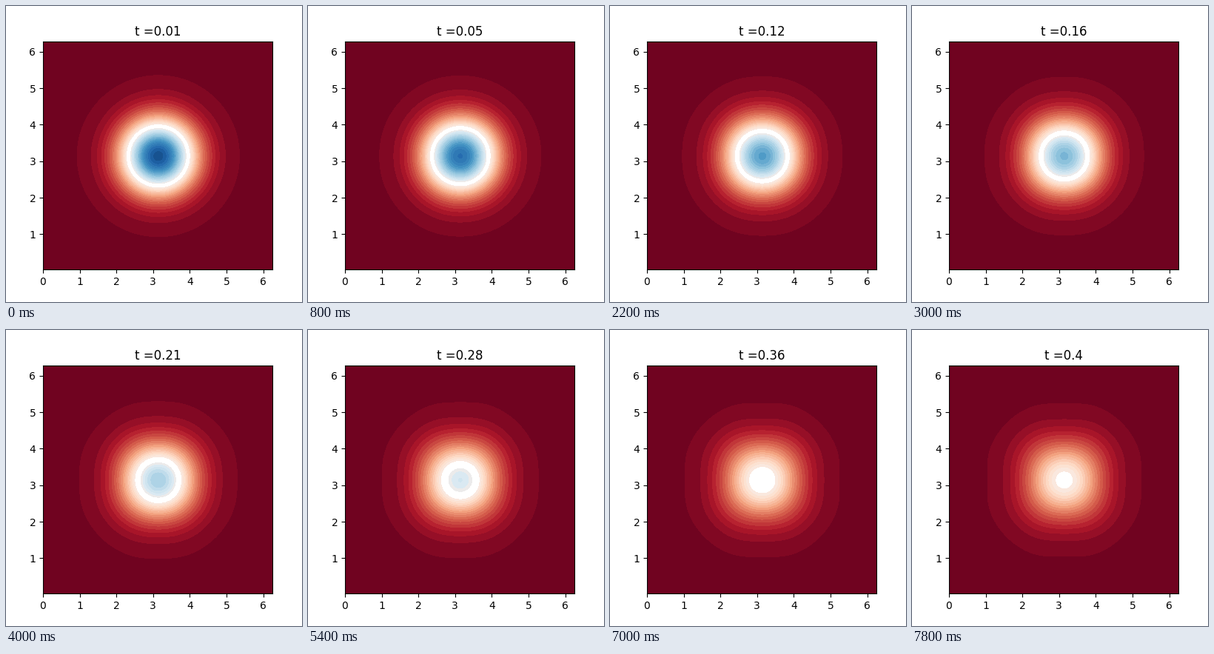
Animation, 400 px wide and 400 px high, one loop 8000 ms. Source, as a matplotlib script:

```python
import numpy as np
import matplotlib.pyplot as plt
from matplotlib.animation import FuncAnimation

FRAMES, STEP_MS = 40, 200
DT = 0.01
N = 200
H = 2 * np.pi / N

x = np.arange(N) * H
X, Y = np.meshgrid(x, x + H)
DX, DY = X - np.pi, Y - np.pi
R2 = DX**2 + DY**2

# The bump sinks fastest in the middle and along both axes, hardly on the diagonals.
RATE = (1.75 - 0.09 * R2) * np.exp(-0.5 * (DX * DY) ** 2)

LEVELS = np.linspace(-0.02, 1.05, 40)
BANDS = len(LEVELS) - 1
MID = BANDS // 2


def band_colors():
    colors = list(plt.get_cmap("RdBu")((np.arange(BANDS) + 0.5) / BANDS))
    for i in (MID - 1, MID, MID + 1):
        colors[i] = "white"
    colors[MID + 2] = "#ecebeb"
    return colors


COLORS = band_colors()

fig, ax = plt.subplots(figsize=(4, 4), dpi=100)


def draw(k):
    t = (k + 1) * DT
    ax.clear()
    u = np.exp(-R2 - RATE * t)
    ax.contourf(X, Y, u, levels=LEVELS, colors=COLORS)
    ax.set_title("t =" + str(round(t, 2)))


anim = FuncAnimation(fig, draw, frames=FRAMES, interval=STEP_MS,
                     init_func=lambda: draw(0), repeat=True, repeat_delay=0)
plt.show()
```
